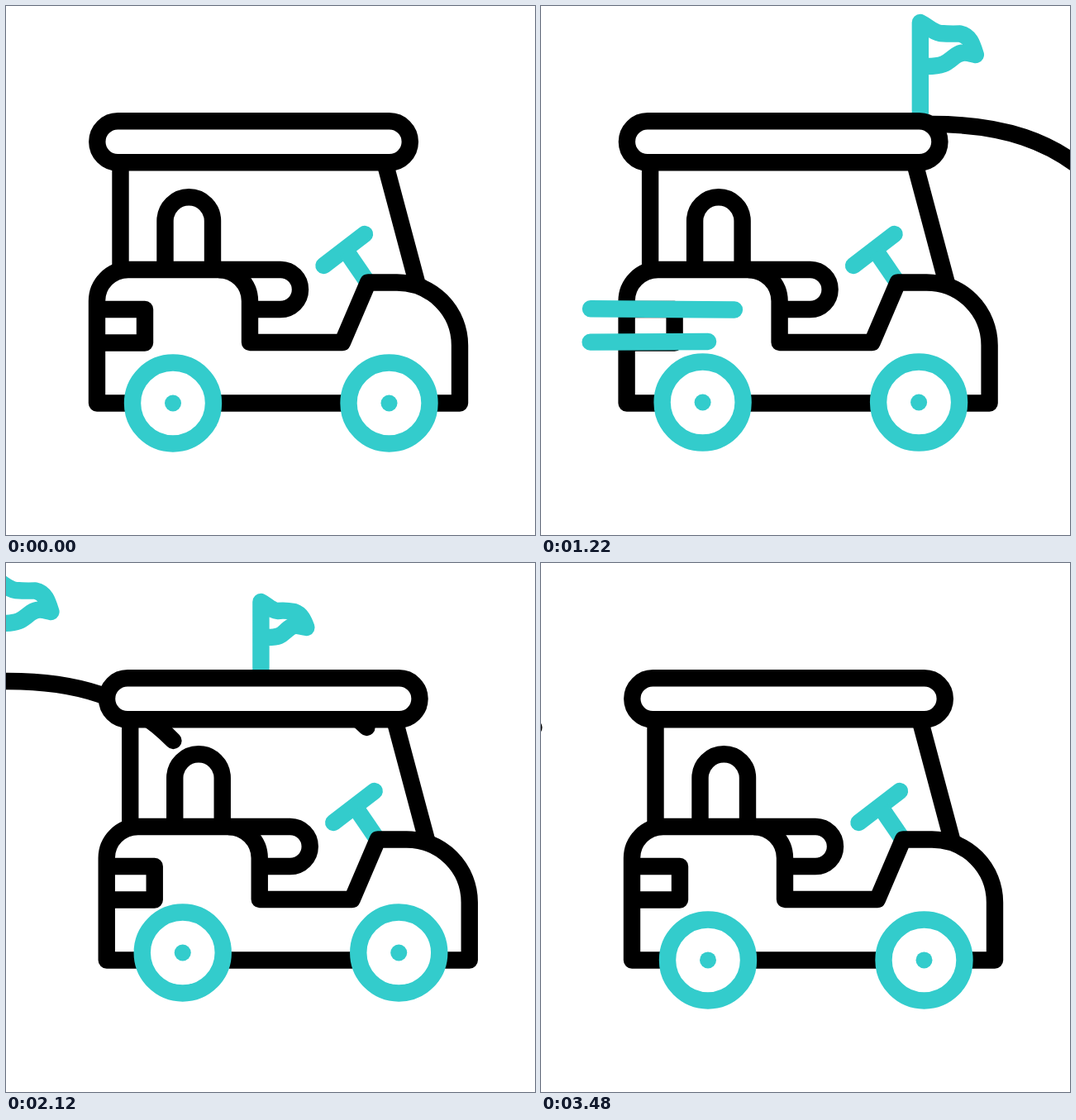
An HTML page for the animation above (3.6 s loop, 640 px wide and 640 px high).

```html
<!DOCTYPE html>
<html lang="en">
<head>
<meta charset="utf-8">
<title>Golf cart</title>
<style>
  html, body { margin: 0; width: 100%; height: 100%; overflow: hidden; background: #fff; }
  svg { display: block; width: 100vw; height: 100vh; }
  .k, .c { fill: none; stroke-width: 20.4; stroke-linejoin: round; }
  .k { stroke: #000; }
  .c { stroke: #3cc; }
  .round { stroke-linecap: round; }
  .solid { fill: #fff; }
  .hub { fill: #3cc; }
</style>
</head>
<body>
<svg viewBox="0 0 640 640">
  <g id="hills">
    <path class="c round" d="M0 138V20C10 25 14 31 24 33Q36 34 48 33.500C60 36 63 46 67 59C58 57 52 54 43 60C34 66 32 73 8 73"/>
    <path class="k round" d="M-115 180C-75 155-30 143 15 143C95 143 163 161 215 215"/>
    <g transform="translate(321)">
      <path class="c round" d="M0 142V47C8 51 12 57 20 58Q30 57 40 59C49 62 52 70 55 78C47 77 42 73 34 79C26 85 26 90 8 90"/>
      <path class="k round" d="M-120 193C-85 160-40 146 2 146C55 146 90 162 128 199"/>
    </g>
  </g>
  <g id="rays"></g>
  <g id="cart">
    <path class="c round" d="M384.500 314L434 276"/>
    <path class="c" d="M412 297L438 335"/>
    <path class="k" d="M138.500 190V320M458.500 190L498 338"/>
    <path class="k" d="M192.500 319V260A28.750 28.750 0 0 1 250 260V319"/>
    <path class="k" d="M257 319H332A24 24 0 0 1 332 367H295"/>
    <path class="k" d="M110 367H168V407.500H110"/>
    <path class="k" d="M110 480.500V357A38 38 0 0 1 148 319H257A38 38 0 0 1 295 357V407H407L438 334.500H473A76 76 0 0 1 549 410.500V480.500Z"/>
    <rect class="k solid" x="110.300" y="139.300" width="378.500" height="50" rx="25"/>
    <g id="wheels"></g>
  </g>
  <g id="streaks"></g>
</svg>
<script>
const LOOP = 3600, STEP = 20;
const $ = id => document.getElementById(id);

function add(parent, tag, attrs) {
  const el = document.createElementNS('http://www.w3.org/2000/svg', tag);
  for (const k in attrs) el.setAttribute(k, attrs[k]);
  return parent.appendChild(el);
}

for (const cx of [202, 463.5]) {
  add($('wheels'), 'circle', { class: 'c solid', cx, cy: 480.5, r: 49 });
  add($('wheels'), 'circle', { class: 'hub', cx, cy: 480.5, r: 10 });
}

const clamp = (v, lo, hi) => Math.min(hi, Math.max(lo, v));

const ease = (t, a, b) => {
  const s = clamp((t - a) / (b - a), 0, 1);
  return s * s * (3 - 2 * s);
};

// The cart drifts forward, back and forward again, then settles
function sway(t) {
  const fade = ease(t, 200, 720) * (1 - ease(t, 2330, 3240));
  return 17.2 * fade * Math.cos(Math.PI * (clamp(t, 720, 2330) - 720) / 805);
}

// Each bump lifts the wheels, drops them once and lowers them back
function bounce(t) {
  const u = (t + 890) % 1090;
  const lift = ease(u, 0, 230) - ease(u, 720, 1085);
  const drop = ease(u, 230, 480) - ease(u, 480, 625);
  return 15.5 * drop - 11.5 * lift;
}

// A dash that runs along a line: its head leaves first, its tail follows
function dash(parent, from, to, head, tail) {
  const el = add(parent, 'line', { class: 'c round' });
  const put = (n, f) => {
    el.setAttribute('x' + n, from[0] + (to[0] - from[0]) * f);
    el.setAttribute('y' + n, from[1] + (to[1] - from[1]) * f);
  };
  return t => {
    const h = ease(t, ...head), e = ease(t, ...tail);
    el.style.display = h > 0 && e < 1 ? '' : 'none';
    put(1, e);
    put(2, h);
  };
}

function ray(i) {
  const x = 521.5 + 26.5 * i, y = 335 + 18.7 * i, a = Math.PI / 2 - 0.668 * i, len = 51 - 2 * i;
  const tip = [x + len * Math.cos(a), y - len * Math.sin(a)];
  return dash($('rays'), [x, y], tip, [2740, 3000], [2790, 3060]);
}

const dashes = [
  dash($('streaks'), [590, 370], [60, 366.3], [440, 1020], [850, 1450]),
  dash($('streaks'), [412, 405], [33, 406.7], [600, 1340], [691, 1678]),
  ...[0, 1, 2].map(ray)
];

function draw(ms) {
  const t = clamp(Math.floor(ms / STEP) * STEP, 200, 3480);
  const move = (id, x, y) => $(id).setAttribute('transform', `translate(${x} ${y})`);
  move('hills', 769 - 1227 * ease(t, 100, 3510), 0);
  move('cart', sway(t), 0);
  move('wheels', 0, bounce(t));
  dashes.forEach(d => d(t));
}

const start = performance.now();
function tick() {
  draw((performance.now() - start) % LOOP);
  requestAnimationFrame(tick);
}
tick();
</script>
</body>
</html>
```
